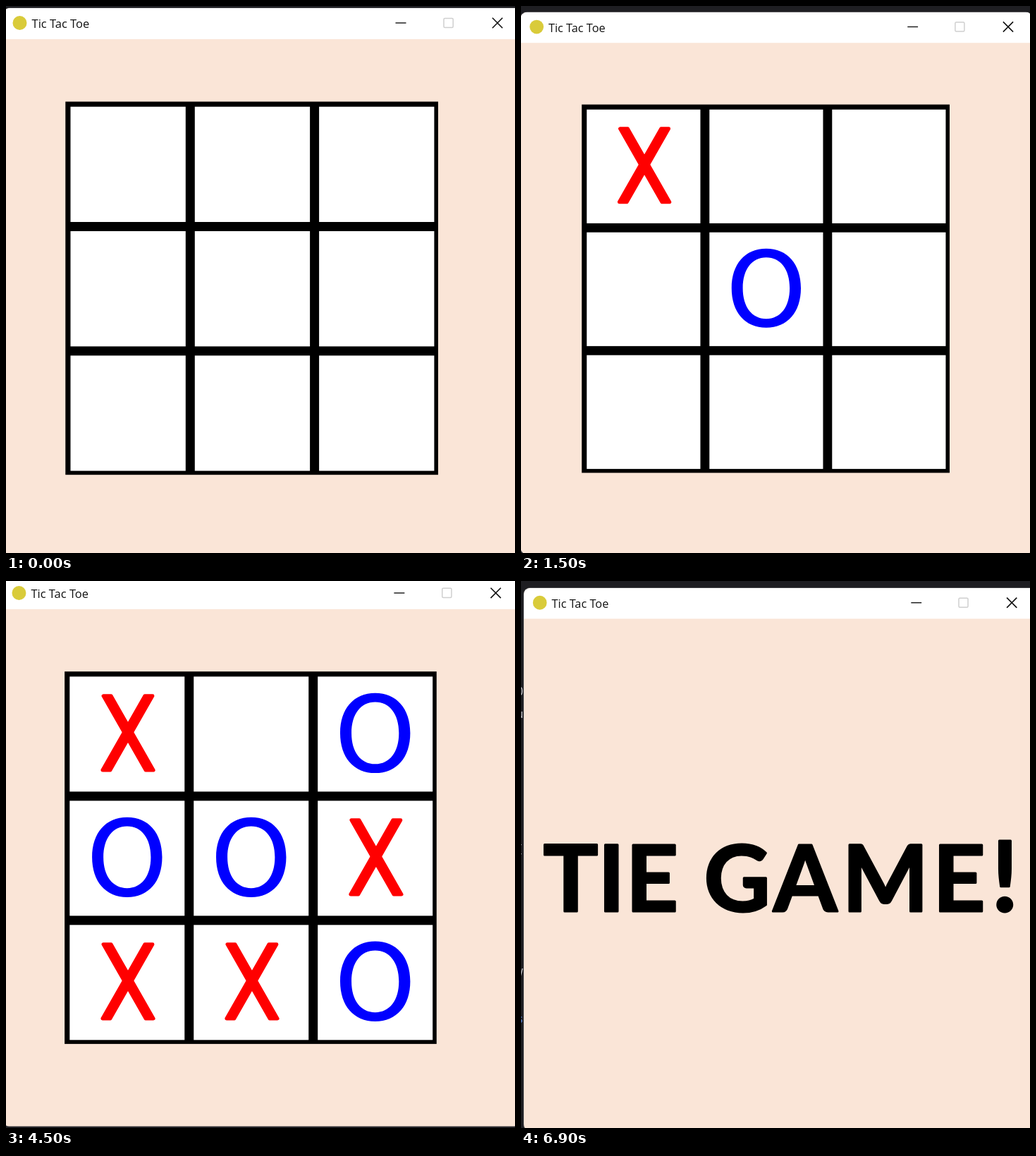
Recreate the animation shown at these times as an HTML page with a canvas. Size 722 px wide and 775 px high, loop 7500 ms.

```html
<!DOCTYPE html>
<html lang="en">
<head>
<meta charset="utf-8">
<title>Tic Tac Toe</title>
<style>
  html, body { margin: 0; width: 100%; height: 100%; overflow: hidden; background: #1e1e22; }
  canvas { display: block; width: 722px; height: 775px; }
</style>
</head>
<body>
<canvas id="stage" width="722" height="775"></canvas>
<script>
const ctx = document.getElementById('stage').getContext('2d');
const STEP = 1500;
const DARK = '#1e1e22', PEACH = '#fae5d7';

// Window position and scale per step; board rows read left to right.
const steps = [
  { x: -3.5, y: 3, s: 1, board: '.........' },
  { x: -0.5, y: 8.8, s: 0.987, board: 'X...O....' },
  { x: 3.2, y: 10, s: 0.987, board: 'X..OO.X..', editor: true },
  { x: -4.5, y: -4, s: 0.998, board: 'X.OOOXXXO' },
  { x: 4, y: 10, s: 0.988, editor: true }
];

function line(color, width, ...pts) {
  ctx.strokeStyle = color;
  ctx.lineWidth = width;
  ctx.beginPath();
  for (let i = 0; i < pts.length; i += 4) {
    ctx.moveTo(pts[i], pts[i + 1]);
    ctx.lineTo(pts[i + 2], pts[i + 3]);
  }
  ctx.stroke();
}

function rect(color, x, y, w, h) {
  ctx.fillStyle = color;
  ctx.fillRect(x, y, w, h);
}

function drawX(cx, cy) {
  ctx.fillStyle = ctx.strokeStyle = '#f00';
  ctx.lineWidth = 5;
  ctx.lineJoin = 'round';
  const h = 52.7, top = 29.5, bottom = 30.7, half = 5.5;
  for (const d of [1, -1]) {
    ctx.beginPath();
    ctx.moveTo(cx - d * top - half, cy - h);
    ctx.lineTo(cx - d * top + half, cy - h);
    ctx.lineTo(cx + d * bottom + half, cy + h);
    ctx.lineTo(cx + d * bottom - half, cy + h);
    ctx.closePath();
    ctx.fill();
    ctx.stroke();
  }
}

// Slightly squared oval
function oval(cx, cy, a, b) {
  const k = 0.61, p = a * k, q = b * k;
  ctx.moveTo(cx, cy - b);
  ctx.bezierCurveTo(cx + p, cy - b, cx + a, cy - q, cx + a, cy);
  ctx.bezierCurveTo(cx + a, cy + q, cx + p, cy + b, cx, cy + b);
  ctx.bezierCurveTo(cx - p, cy + b, cx - a, cy + q, cx - a, cy);
  ctx.bezierCurveTo(cx - a, cy - q, cx - p, cy - b, cx, cy - b);
}

function drawO(cx, cy) {
  ctx.fillStyle = '#00f';
  ctx.beginPath();
  oval(cx, cy, 49.8, 56.8);
  oval(cx, cy, 33.7, 44);
  ctx.fill('evenodd');
}

function drawBoard(marks) {
  const x0 = 87.8, y0 = 132.5, pitch = 176.3, cell = 163.3;
  rect('#000', x0, y0, 528.7, 528.7);
  [...marks].forEach((m, i) => {
    const x = x0 + 7.2 + (i % 3) * pitch;
    const y = y0 + 7.2 + Math.floor(i / 3) * pitch;
    rect('#fff', x, y, cell, cell);
    const cx = x + cell / 2, cy = y + cell / 2 - 1.5;
    if (m === 'X') drawX(cx + 1.2, cy);
    if (m === 'O') drawO(cx, cy);
  });
}

function drawTitleBar() {
  rect('#fff', 0, 0, 740, 44);
  ctx.fillStyle = '#d9cb3a';
  ctx.beginPath();
  ctx.arc(23, 21, 10, 0, Math.PI * 2);
  ctx.fill();

  ctx.fillStyle = '#111';
  ctx.font = '16.5px "Open Sans", "Noto Sans", sans-serif';
  ctx.textAlign = 'left';
  ctx.fillText('Tic Tac Toe', 40, 28.3);

  const y = 21, close = 700.6, r = 7.2;
  line('#222', 1.4, 556, y, 571, y);
  ctx.strokeStyle = '#cfcfcf';
  ctx.lineWidth = 1.5;
  ctx.beginPath();
  ctx.roundRect(624.5, y - 6.6, 13.2, 13.2, 1.5);
  ctx.stroke();
  line('#111', 1.6, close - r, y - r, close + r, y + r, close - r, y + r, close + r, y - r);
}

// Ends of code lines peeking out beside the window
function drawEditor() {
  ctx.font = '15px "DejaVu Sans Mono", monospace';
  ctx.textAlign = 'right';
  const bits = [['0', 162], ['u', 194], ['[', 385], ['V', 561], ['s', 626]];
  for (const [ch, y] of bits) {
    ctx.fillStyle = ch === 's' ? '#5b86d6' : '#c4c4c8';
    ctx.fillText(ch, 3.4, y);
  }
}

function drawResult() {
  const glyphs = [['T', 70.5], ['I', 128.5], ['E', 188.5], ['G', 305.5],
                  ['A', 403], ['M', 517], ['E', 624], ['!', 686]];
  ctx.fillStyle = ctx.strokeStyle = '#000';
  ctx.lineWidth = 3;
  ctx.lineJoin = 'round';
  ctx.textAlign = 'left';
  for (const [ch, cx] of glyphs) {
    ctx.font = `700 ${ch === '!' ? 138 : 130}px Lato, "Open Sans", sans-serif`;
    const m = ctx.measureText(ch);
    const x = cx - (m.actualBoundingBoxRight - m.actualBoundingBoxLeft) / 2;
    ctx.fillText(ch, x, 467.5);
    ctx.strokeText(ch, x, 467.5);
  }
}

function draw(step) {
  rect(DARK, 0, 0, 722, 775);
  if (step.editor) drawEditor();

  ctx.save();
  ctx.translate(step.x, step.y);
  ctx.scale(step.s, step.s);
  ctx.beginPath();
  ctx.roundRect(0, 0, 735, 778, 9);
  ctx.strokeStyle = '#4a4a4e';
  ctx.lineWidth = 1.6;
  ctx.stroke();
  ctx.clip();
  rect(PEACH, 0, 0, 740, 780);
  drawTitleBar();
  if (step.board) drawBoard(step.board);
  ctx.restore();

  if (!step.board) drawResult();
}

let start;
function tick(now) {
  start ??= now;
  draw(steps[Math.floor((now - start) / STEP) % steps.length]);
  requestAnimationFrame(tick);
}
draw(steps[0]);
requestAnimationFrame(tick);
</script>
</body>
</html>
```
